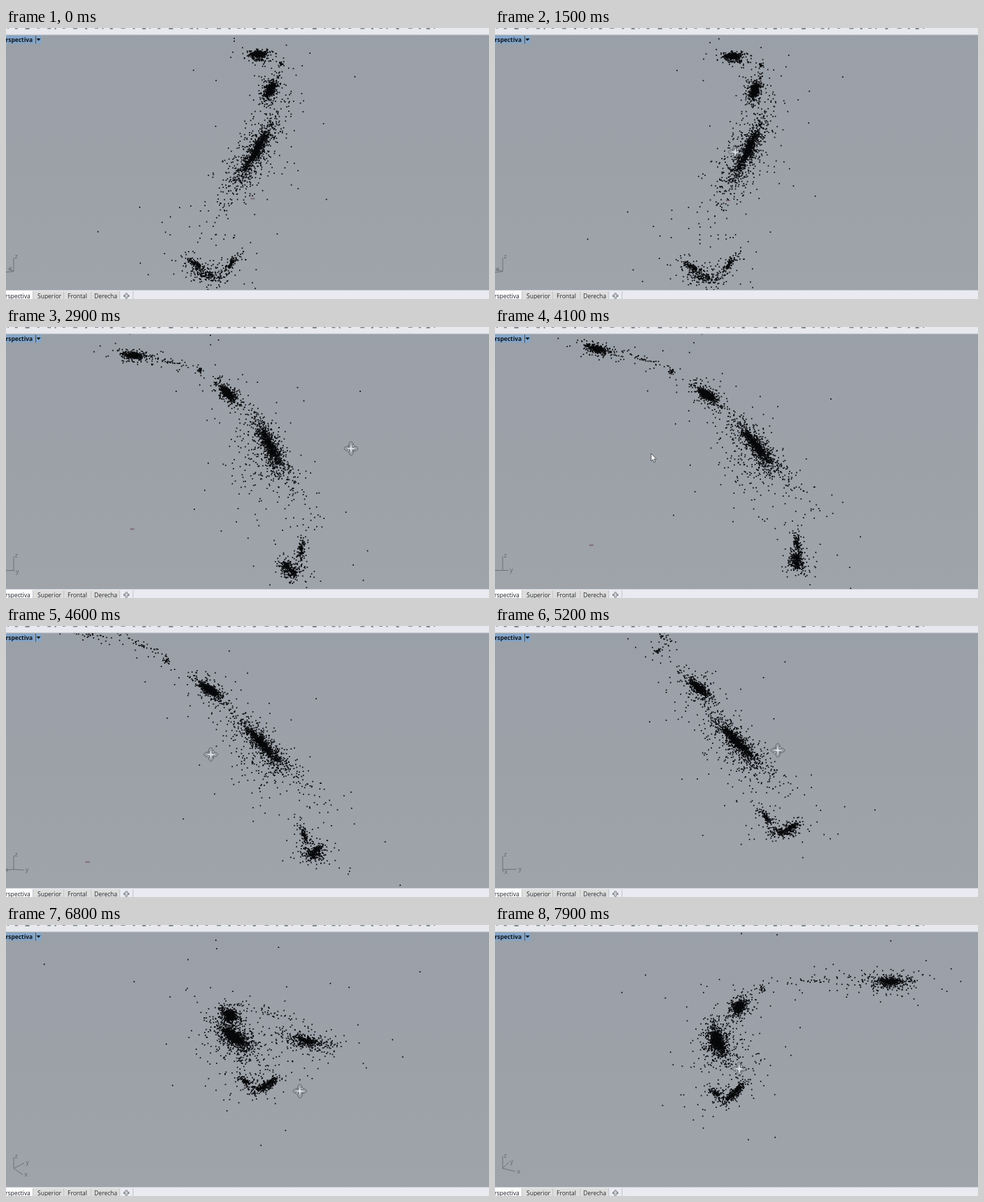
Recreate the animation shown at these times as an HTML page with a canvas. Size 690 by 388 pixels, loop 8 s.

```html
<!DOCTYPE html>
<html lang="es">
<head>
<meta charset="utf-8">
<style>
html, body { margin: 0; width: 690px; height: 388px; overflow: hidden; background: #9ca1a9; }
canvas { display: block; }
</style>
</head>
<body>
<canvas id="stage" width="690" height="388"></canvas>
<script>
const ctx = document.getElementById('stage').getContext('2d');
const LOOP = 8000, STEP = 100;
const CENTER = [345, 193], DISTANCE = 500;
const UI_FONT = '"Open Sans", "Noto Sans", sans-serif';
const RAD = Math.PI / 180;

let seed = 7;
function random() {
  seed = (seed + 0x6D2B79F5) | 0;
  let t = Math.imul(seed ^ (seed >>> 15), 1 | seed);
  t = (t + Math.imul(t ^ (t >>> 7), 61 | t)) ^ t;
  return ((t ^ (t >>> 14)) >>> 0) / 4294967296;
}
const gauss = () => Math.sqrt(-2 * Math.log(1 - random())) * Math.cos(2 * Math.PI * random());

// Keys are [time, ...values], joined by straight lines.
function atTime(keys, t) {
  let i = 0;
  while (i < keys.length - 2 && t >= keys[i + 1][0]) i++;
  const a = keys[i], b = keys[i + 1];
  const k = Math.max(0, Math.min(1, (t - a[0]) / (b[0] - a[0])));
  return a.map((v, j) => v + (b[j] - v) * k).slice(1);
}

// Time, yaw, pitch: two drags with a pause between them.
const orbit = [[1300, 90, 12], [2200, 55, 8], [2900, 20, 5], [3400, 0, 0],
  [4300, 0, 0], [5200, -68, 12], [6100, -92, 41], [7900, -130, 30]];
const pointer = [[1300, 322, 178], [2900, 493, 174], [3400, 540, 174], [4100, 223, 187],
  [4300, 237, 187], [5200, 404, 178], [6100, 465, 258], [7900, 349, 206]];

// A stretched, heavy-tailed ball of points around a place in space.
function cluster(count, center, stretch, radius) {
  return Array.from({ length: count }, () => {
    const reach = 0.85 * Math.exp(0.6 * gauss()), along = gauss();
    return center.map((c, i) => c + reach * (stretch[i] * along + radius * gauss()));
  });
}

const cloud = [
  cluster(480, [21, -207, -168], [7, 5, 0], 3.5),     // crown
  cluster(50, [24, -137, -153], [6, 15, 4], 4),       // thin trail
  cluster(24, [56, -103, -143], [0, 0, 0], 2.5),      // small knot
  cluster(640, [34, -45, -102], [-4, 8, 6], 3.6),     // upper body
  cluster(850, [13, 28, -25], [-12, 14, 18], 5),      // middle body
  cluster(400, [2, 38, -9], [-18, 18, 26], 13),       // loose skirt
  cluster(150, [-66, 74, 119], [7, 1, 5], 4),         // base, left
  cluster(130, [-20, 83, 112], [6, 0, -7], 3),        // base, right
  cluster(190, [-51, 78, 132], [15, 0, 3], 6),        // base, middle
  cluster(110, [0, 10, 5], [-22, 40, 58], 28)         // strays
].flat();

const marker = [11, -212, 122];
const axes = { x: [-0.41, -0.91, 0], y: [-0.91, 0.41, 0], z: [0, 0, -1] };

// Returns a turning function: world point to screen right, screen down, depth.
function camera(yaw, pitch) {
  const sy = Math.sin(yaw * RAD), cy = Math.cos(yaw * RAD);
  const sp = Math.sin(pitch * RAD), cp = Math.cos(pitch * RAD);
  return ([x, y, z]) => {
    const away = x * cy - y * sy;
    return [x * sy + y * cy, z * cp - away * sp, away * cp + z * sp];
  };
}

function project(turn, point) {
  const [x, y, depth] = turn(point);
  const scale = DISTANCE / (DISTANCE + depth);
  return [CENTER[0] + x * scale, CENTER[1] + y * scale];
}

function box(x, y, w, h, color) {
  ctx.fillStyle = color;
  ctx.fillRect(x, y, w, h);
}

function label(text, x, y, size, color, weight = 400) {
  ctx.font = `${weight} ${size}px ${UI_FONT}`;
  ctx.fillStyle = color;
  ctx.fillText(text, x, y);
}

function path(points, stroke, fill) {
  ctx.beginPath();
  points.forEach(([x, y]) => ctx.lineTo(x, y));
  if (fill) {
    ctx.closePath();
    ctx.fillStyle = fill;
    ctx.fill();
  }
  if (stroke) {
    ctx.strokeStyle = stroke;
    ctx.stroke();
  }
}

function drawScene(turn) {
  const [mx, my] = project(turn, marker);
  box(mx - 3, my - 1, 6, 2, '#7f6c73');
  for (const point of cloud) {
    const [x, y] = project(turn, point);
    box(x - 0.85, y - 0.85, 1.7, 1.7, '#08090b');
  }
}

function drawAxes(turn) {
  ctx.lineWidth = 1;
  for (const name in axes) {
    const [dx, dy] = turn(axes[name]).map(v => v * 20);
    path([[11, 348.5], [11 + dx, 348.5 + dy]], '#6c7077');
    label(name, 12.5 + dx * 1.05, 351 + dy * 1.05, 9, '#62666d');
  }
}

function drawOrbit() {
  ctx.lineWidth = 0.9;
  ctx.strokeStyle = '#5d626a';
  for (const [rx, ry] of [[10, 4], [4, 10]]) {
    ctx.beginPath();
    ctx.ellipse(0, 0, rx, ry, 0, 0, 2 * Math.PI);
    ctx.stroke();
  }
  box(-0.8, -5, 1.6, 10, '#e4e6ea');
  box(-5, -0.8, 10, 1.6, '#e4e6ea');
  path([[2, -6], [5, -3], [2, -2]], '#5d626a', '#fff');
  path([[-6, 2], [-2, 2], [-4, 5]], '#5d626a', '#fff');
}

function drawArrow() {
  ctx.lineWidth = 0.8;
  path([[0, -6], [0, 5], [2.5, 2.7], [4.2, 6.8], [6, 6], [4.3, 2], [7.6, 2], [0, -6]], '#30343a', '#fff');
}

function drawPointer(t) {
  if (t < 1400) return;
  ctx.save();
  ctx.translate(...atTime(pointer, t));
  if (t > 3400 && t < 4300) drawArrow();
  else drawOrbit();
  ctx.restore();
}

function drawChrome() {
  box(0, 0, 690, 10, '#e7e9ee');
  box(0, 9.5, 690, 1, '#b4b8bf');
  // lower edges of the cut-off toolbar
  for (let i = 0; i < 46; i++) {
    const x = 2 + i * 13.6 + 3 * Math.sin(i * 5);
    box(x, 0, 2 + (i * 7) % 5, 1 + (i % 3) * 0.5, '#85898f');
  }

  box(0, 11, 41, 11.5, '#83a5c8');
  label('rspectiva', -0.5, 20, 8.4, '#10151c', 700);
  box(42, 11, 9, 11.5, '#83a5c8');
  box(42, 11, 1, 11.5, '#3e5369');
  path([[43.5, 15], [49.5, 15], [46.5, 18.5]], null, '#10151c');

  box(0, 375, 690, 13, '#e9ebf1');
  box(0, 375, 690, 1, '#c9ccd2');
  box(0, 376, 38, 12, '#fbfbfc');
  box(39, 377, 123, 11, '#dddddc');
  for (const x of [38, 82, 121, 162, 181]) box(x, 377, 1, 11, '#c3c5c9');
  const tabs = { rspectiva: -1, Superior: 45, Frontal: 88, Derecha: 126 };
  for (const name in tabs) label(name, tabs[name], 386.5, 8.5, '#20242a');
  ctx.lineWidth = 1;
  ctx.strokeStyle = '#696d74';
  ctx.strokeRect(171, 380, 2, 7);
  ctx.strokeRect(168.5, 382.5, 7, 2);
  box(171.5, 380.5, 1, 6, '#fff');
  box(169, 383, 6, 1, '#fff');
}

const backdrop = ctx.createLinearGradient(0, 10, 0, 375);
backdrop.addColorStop(0, '#9aa0a8');
backdrop.addColorStop(1, '#9fa3aa');

function draw(now) {
  const t = Math.floor((now % LOOP) / STEP) * STEP;
  const turn = camera(...atTime(orbit, t));
  box(0, 0, 690, 388, backdrop);
  drawAxes(turn);
  drawScene(turn);
  drawPointer(t);
  drawChrome();
}

const start = performance.now();
function tick() {
  draw(performance.now() - start);
  requestAnimationFrame(tick);
}
tick();
</script>
</body>
</html>
```
